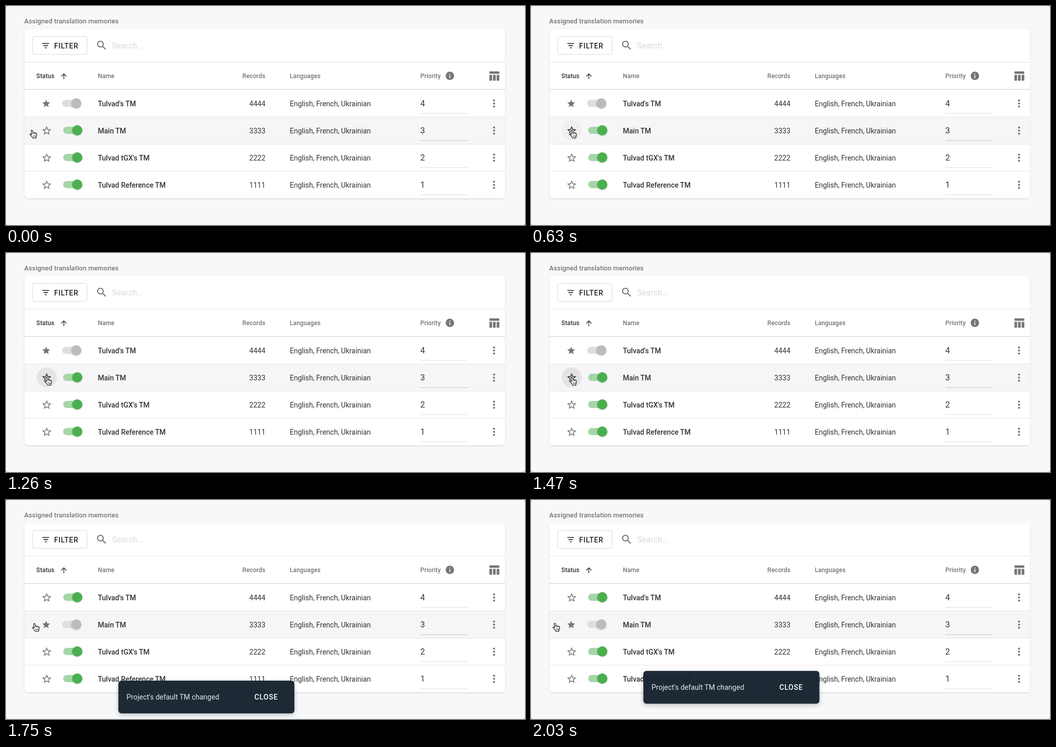
Write an HTML page that moves like this. It is 1014 px wide and 428 px high and loops after 2.45 s.

```html
<!DOCTYPE html>
<html lang="en">
<head>
<meta charset="utf-8">
<title>Translation memories</title>
<style>
  html, body { margin: 0; width: 100%; height: 100%; overflow: hidden; background: #6b6d70; }
  svg { display: block; width: 100%; height: 100%; }
  text { font: 400 14px Roboto, sans-serif; fill: #333; white-space: pre; }
  .bold { font-weight: 500; }
  .head { font-weight: 500; font-size: 12px; letter-spacing: .12px; fill: #757575; }
  .btn { font-weight: 500; letter-spacing: .75px; }
  .num { font-size: 16px; }
</style>
</head>
<body>
<svg id="stage" viewBox="0 0 1014 428" xmlns="http://www.w3.org/2000/svg"></svg>
<script>
const LOOP = 2450, STEP = 70, SWAP = 1540;
const GREY = '#757575';
const GREEN_TRACK = [165, 214, 167], GREEN_THUMB = [76, 175, 80];
const OFF_TRACK = [222, 222, 222], OFF_THUMB = [188, 188, 188];

const SOLID = 'M12 17.27L18.18 21l-1.64-7.03L22 9.24l-7.19-.61L12 2 9.19 8.63 2 9.24l5.46 4.73L5.82 21z';
const HOLLOW = 'M22 9.24l-7.19-.62L12 2 9.19 8.63 2 9.24l5.46 4.73L5.82 21 12 17.27 18.18 21l-1.63-7.03L22 9.24z' +
  'M12 15.4l-3.76 2.27 1-4.28-3.32-2.88 4.38-.38L12 6.1l1.71 4.04 4.38.38-3.32 2.88 1 4.28L12 15.4z';
const LENS = 'M15.5 14h-.79l-.28-.27C15.41 12.59 16 11.11 16 9.5 16 5.91 13.09 3 9.5 3S3 5.91 3 9.5 5.91 16 9.5 16' +
  'c1.61 0 3.09-.59 4.23-1.57l.27.28v.79l5 4.99L20.49 19l-4.99-5zm-6 0C7.01 14 5 11.99 5 9.5S7.01 5 9.5 5 14 7.01 14 9.5 11.99 14 9.5 14z';
const HAND = 'M3.2 1.7C3.5.4 5.4.4 5.8 1.7L6.8 6.2C7.2 5.2 9 5.2 9.4 6.5 9.9 5.7 11.5 5.9 11.8 7.1 12.5 6.5 13.9 6.9 14 8.3' +
  'L13.8 11.5C13.6 13 12.7 13.6 12.6 16.3H6.2C5.8 14.5 4 12.6 1.2 9.7.3 8.5 1.6 7.4 2.8 8.2L4.4 9.6Z';

const text = (x, y, s, cls = '', extra = '') => `<text x="${x}" y="${y}" class="${cls}" ${extra}>${s}</text>`;
const rect = (x, y, w, h, fill, extra = '') => `<rect x="${x}" y="${y}" width="${w}" height="${h}" fill="${fill}" ${extra}/>`;
const circle = (x, y, r, fill, extra = '') => `<circle cx="${x}" cy="${y}" r="${r}" fill="${fill}" ${extra}/>`;
const line = (d, w, color) => `<path d="${d}" fill="none" stroke="${color}" stroke-width="${w}"/>`;

const names = ["Tulvad's TM", 'Main TM', "Tulvad tGX's TM", 'Tulvad Reference TM'];

function row(name, i) {
  const y = 190 + 53 * i, n = 4 - i;
  return `<path id="star${i}"/>
    <g id="toggle${i}">${rect(-27.5, y - 7, 35, 14, '#ccc', 'rx="7"')}${circle(0, y, 10, '#ccc', 'filter="url(#soft)"')}</g>` +
    text(179.5, y + 5.6, name, 'bold') +
    text(506.8, y + 5.6, String(n).repeat(4), '', 'text-anchor="end"') +
    text(554.5, y + 5.6, 'English, French, Ukrainian') +
    text(809.5, y + 6.4, n, 'num') +
    rect(809.5, y + 19.3, 92, i === 1 ? 1.6 : 1, i === 1 ? '#d6d6d8' : '#dcdcdc') +
    [-6, 0, 6].map(d => circle(953.5, y + .5 + d, 2, GREY)).join('');
}

document.getElementById('stage').innerHTML = `
  <defs>
    <filter id="soft" x="-30%" y="-30%" width="160%" height="160%"><feDropShadow dx="0" dy="1" stdDeviation="1" flood-opacity=".22"/></filter>
    <filter id="card" x="-5%" y="-5%" width="110%" height="112%"><feDropShadow dx="0" dy="1" stdDeviation="1.3" flood-opacity=".17"/></filter>
    <filter id="lift" x="-10%" y="-30%" width="120%" height="170%"><feDropShadow dx="0" dy="3" stdDeviation="4" flood-opacity=".25"/></filter>
  </defs>
  ${rect(0, 0, 1014, 428, '#f7f8fa', 'rx="3"')}
  ${text(35.5, 33.6, 'Assigned translation memories', 'head', 'style="font-size:13px;letter-spacing:.1px"')}
  ${rect(36, 45, 939, 331, '#fff', 'rx="7" filter="url(#card)"')}
  ${rect(36, 217, 939, 53, '#f6f6f8')}
  ${rect(36, 109.5, 939, 1, '#e2e2e2')}
  ${rect(36, 162.3, 939, 1.7, '#e0e0e0')}
  ${[216.5, 269.5, 322.5].map(y => rect(36, y, 939, 1, '#e6e6e7')).join('')}

  ${rect(52, 59.5, 106.5, 35, '#fff', 'rx="4" stroke="#d8d8d8"')}
  ${line('M71 73.2H84.2M73.2 77.4H82M76 81.6H79.2', 1.6, '#222')}
  ${text(94, 83, 'FILTER', 'btn', 'style="fill:#222"')}
  <path d="${LENS}" transform="translate(175 65)" fill="${GREY}"/>
  ${text(207, 82.6, 'Search...', 'num', 'style="fill:#dadada"')}

  ${text(59.3, 141, 'Status', 'head', 'style="fill:#333"')}
  ${line('M113 143V133M108 137.6L113 132.6L118 137.6', 1.5, '#444')}
  ${text(179.5, 141, 'Name', 'head')}
  ${text(506.8, 141, 'Records', 'head', 'text-anchor="end"')}
  ${text(554.5, 141, 'Languages', 'head')}
  ${text(809.5, 141, 'Priority', 'head')}
  ${circle(867.2, 136.5, 8.2, GREY)}
  ${rect(866.3, 132.2, 1.8, 1.8, '#fff')}${rect(866.3, 135.6, 1.8, 5.2, '#fff')}
  ${rect(944.5, 127.7, 19.3, 4.8, GREY, 'rx="1.2"')}
  ${[944.5, 951.5, 958.6].map(x => rect(x, 134.4, 5.2, 11.6, GREY, 'rx="1"')).join('')}

  ${circle(79.5, 243, 19.8, '#000', 'id="halo"')}
  ${names.map(row).join('')}

  <g id="snack">
    ${rect(219.5, 0, 344, 64, 'rgb(25,33,46)', 'rx="6" fill-opacity=".96" filter="url(#lift)"')}
    ${text(235.5, 36.8, "Project's default TM changed", '', 'style="fill:#e6e8ea"')}
    ${text(485.3, 37, 'CLOSE', 'btn', 'style="fill:#fff"')}
  </g>
  ${circle(79.5, 242, 30.6, 'none', 'id="ring" stroke="#000" stroke-width="1.5"')}
  <g id="hand">
    <path d="${HAND}" fill="#fff" stroke="#fff" stroke-width="2.6" stroke-linejoin="round"/>
    <path d="${HAND}" fill="#fff" stroke="#111" stroke-width="1.15" stroke-linejoin="round"/>
    ${line('M6.8 6.2V8.6M9.4 6.5V8.8M11.8 7.1V9M7.7 11V14M9.7 11V14M11.6 11V14', .9, '#222')}
  </g>`;

const $ = id => document.getElementById(id);
const set = (el, attrs) => { for (const k in attrs) el.setAttribute(k, attrs[k]); };
const span = (t, a, b) => Math.min(1, Math.max(0, (t - a) / (b - a)));
const easeOut = (u, power) => 1 - (1 - u) ** power;
const lerp = (a, b, u) => a + (b - a) * u;
const mix = (a, b, u) => `rgb(${a.map((v, i) => Math.round(lerp(v, b[i], u)))})`;

function setStar(i, solid, color) {
  const y = 190 + 53 * i, s = solid ? .77 : .91, x = solid ? 78.5 : 79.5;
  set($('star' + i), {
    d: solid ? SOLID : HOLLOW, fill: color, 'fill-rule': 'evenodd',
    transform: `translate(${x} ${y + .5}) scale(${s}) translate(-12 -11.8)`
  });
}

function setToggle(i, isDefault, off) {
  const [track, thumb] = $('toggle' + i).children;
  set($('toggle' + i), { transform: `translate(${isDefault ? 137.3 : 139.2} ${isDefault ? .3 : 0})` });
  set(track, { fill: mix(GREEN_TRACK, OFF_TRACK, off) });
  set(thumb, { fill: mix(GREEN_THUMB, OFF_THUMB, off) });
}

function draw(t) {
  const chosen = t < SWAP ? 0 : 1;
  const swap = span(t, SWAP, SWAP + 88);
  const hover = t >= 140 && t < SWAP;

  for (let i = 0; i < 4; i++) {
    setStar(i, i === chosen, i === 1 && hover ? '#2c2c2c' : GREY);
    setToggle(i, i === chosen, i === 0 ? 1 - swap : i === 1 ? swap : 0);
  }

  const press = span(t, 980, 1260);
  set($('halo'), { 'fill-opacity': hover ? .028 * span(t, 70, 280) + .045 * press : 0 });
  set($('ring'), { opacity: t < 980 ? 0 : 1 - span(t, 1120, 1230) });

  const go = easeOut(span(t, 0, 630), 2.2);
  const back = easeOut(span(t, 1470, 2030), 1.9);
  const x = lerp(lerp(46, 75, go), 42, back);
  set($('hand'), { transform: `translate(${x} ${lerp(241.8, 240, back)})` });

  const rest = Math.max(0, (2055 - t) * .00875) ** 3;
  set($('snack'), {
    transform: `translate(0 ${334 + rest})`,
    visibility: t < SWAP ? 'hidden' : 'visible'
  });
}

const start = performance.now();
function tick() {
  const t = (performance.now() - start) % LOOP;
  draw(Math.floor(t / STEP) * STEP);
  requestAnimationFrame(tick);
}
tick();
</script>
</body>
</html>
```
